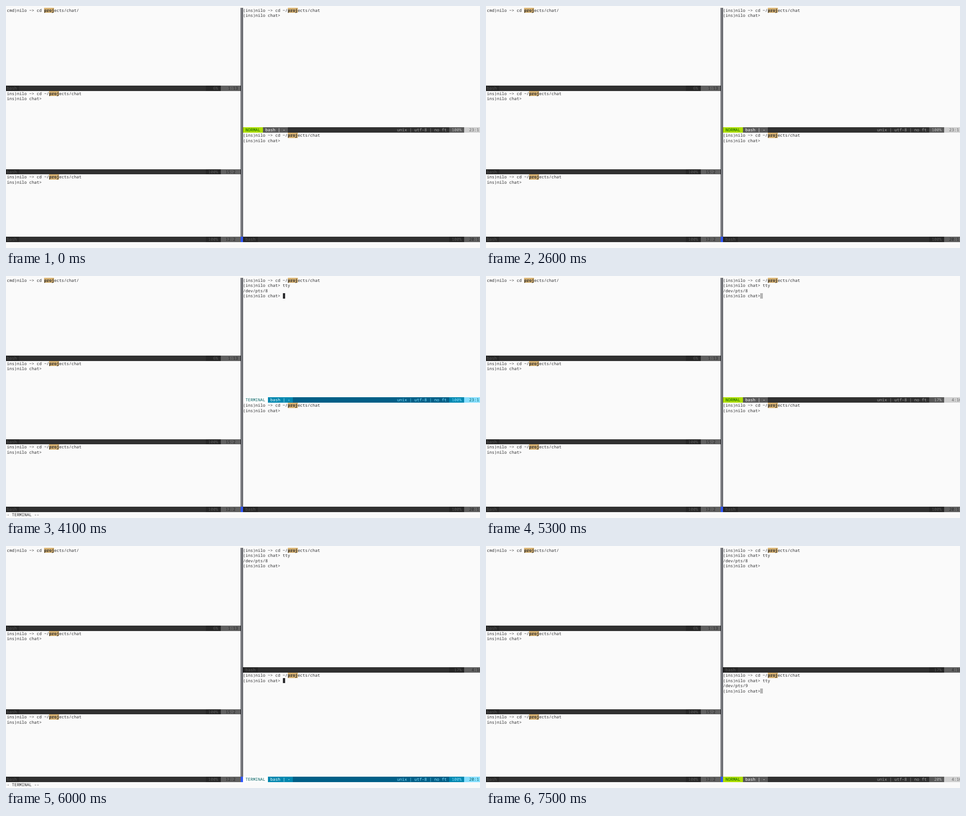
Recreate the animation shown at these times as an HTML page with a canvas. Size 1046 by 535 pixels, loop 8 s.

```html
<!DOCTYPE html>
<html>
<head>
<meta charset="utf-8">
<style>
html, body { margin: 0; width: 100%; height: 100%; overflow: hidden; background: #fafafa; }
canvas { display: block; }
</style>
</head>
<body>
<canvas id="stage" width="1046" height="535"></canvas>
<script>
const ctx = document.getElementById('stage').getContext('2d');
const LOOP = 8000, PAPER = '#fafafa', INK = '#2c2c2e', USER = 'nilo';
const FONT = '9.14px "Noto Sans Mono", monospace';

// Terminal grid: 192 columns, cropped slightly at both sides.
const colX = col => 5.484 * col - 3.48;
const rowY = row => 11.52 * row + 3.5;

function fill(col, row, cols, color, rows = 1) {
  const x = Math.round(colX(col)), y = Math.round(rowY(row));
  ctx.fillStyle = color;
  ctx.fillRect(x, y, Math.round(colX(col + cols)) - x, Math.round(rowY(row + rows)) - y);
}

function put(col, row, text, color = INK, back, bold) {
  if (back) fill(col, row, text.length, back);
  ctx.font = (bold ? 'bold ' : '') + FONT;
  ctx.fillStyle = color;
  ctx.fillText(text, colX(col), rowY(row) + 9);
}

const STYLES = {
  normal: {
    middle: ['#9e9e9e', '#303030'], mode: ['#005f00', '#afdf00'], file: ['#ffffff', '#585858'],
    percent: ['#bcbcbc', '#585858'], place: ['#606060', '#d0d0d0']
  },
  terminal: {
    middle: ['#87dfff', '#005f87'], mode: ['#005f5f', '#ffffff'], file: ['#ffffff', '#0087af'],
    percent: ['#87dfff', '#0087af'], place: ['#005f5f', '#87dfff']
  },
  inactive: {
    middle: ['#585858', '#303030'], file: ['#585858', '#262626'],
    percent: ['#585858', '#262626'], place: ['#262626', '#606060']
  }
};

function statusBar(col, row, width, mode, percent, place) {
  const style = STYLES[mode];
  const right = col + width;
  fill(col, row, width, style.middle[1]);
  if (mode === 'inactive') {
    put(col, row, ' bash ', ...style.file);
  } else {
    const label = ` ${mode.toUpperCase()} `;
    put(col, row, label, ...style.mode);
    put(col + label.length, row, ' bash | - ', ...style.file);
    put(right - 35, row, 'unix | utf-8 | no ft', style.middle[0]);
  }
  const [line, column] = place.split(':');
  put(right - 14, row, ` ${percent.padStart(4)} `, ...style.percent);
  put(right - 8, row, `${line.padStart(4)}:${column.padEnd(3)}`, ...style.place);
}

function cdLine(col, row, mode, path) {
  const lead = `(${mode})${USER} ~> cd ${path}`;
  const skip = col === 0 ? 1 : 0;
  put(col + skip, row, lead.slice(skip));
  put(col + lead.length, row, 'proj', INK, '#d7b272', true);
  put(col + lead.length + 4, row, 'ects/chat' + (path ? '' : '/'));
}

function shell(col, row, typed = '', output) {
  const prompt = `(ins)${USER} chat> `;
  const skip = col === 0 ? 1 : 0;
  cdLine(col, row, 'ins', '~/');
  put(col + skip, row + 1, prompt.slice(skip) + typed);
  if (output) {
    put(col, row + 2, output);
    put(col, row + 3, prompt);
  }
}

// Window state for a session: enter terminal mode, type, run, leave.
function session(t, start, keys, run, leave, idle, done) {
  const ran = t >= run, left = t >= leave;
  const typed = ran ? 'tty' : 'tty'.slice(0, keys.filter(k => t >= k).length);
  return {
    typed, ran,
    mode: t >= start && !left ? 'terminal' : 'normal',
    percent: left ? done : '100%',
    place: left ? '4:16' : idle
  };
}

function drawCursor(win, top, idleRow, left, idleVisible) {
  if (win.mode === 'terminal') {
    fill(112 + (win.ran ? 0 : win.typed.length), top + (win.ran ? 3 : 1), 1, INK);
  } else if (left) {
    fill(111, top + 3, 1, '#b6b6b6');
  } else if (idleVisible) {
    fill(96, idleRow, 1, '#b6b6b6');
  }
}

function draw(t) {
  ctx.fillStyle = PAPER;
  ctx.fillRect(0, 0, 1046, 535);

  cdLine(0, 0, 'cmd', '');
  statusBar(0, 15, 95, 'inactive', '6%', '1:13');
  shell(0, 16);
  statusBar(0, 31, 95, 'inactive', '100%', '15:2');
  shell(0, 32);
  statusBar(0, 44, 95, 'inactive', '100%', '12:2');

  const upper = session(t, 3000, [3600, 3800, 3800], 4100, 5300, '23:1', '17%');
  const lower = session(t, 6000, [6300, 6400, 6600], 6800, 7500, '20:1', '20%');
  const onLower = t >= 5700;
  shell(96, 0, upper.typed, upper.ran && '/dev/pts/8');
  shell(96, 24, lower.typed, lower.ran && '/dev/pts/9');
  statusBar(96, 23, 97, onLower ? 'inactive' : upper.mode, upper.percent, upper.place);
  statusBar(96, 44, 97, onLower ? lower.mode : 'inactive', lower.percent, lower.place);

  if (onLower) {
    drawCursor(lower, 24, 43, t >= 7500, true);
  } else {
    const blink = t >= 2200 ? t < 2600 : (t + 300) % 1000 >= 500;
    drawCursor(upper, 0, 22, t >= 5300, blink);
  }

  fill(95, 0, 1, '#1b1d26', 44);
  ctx.fillStyle = PAPER;
  ctx.fillRect(519.8, rowY(0), 1.4, rowY(44) - rowY(0));
  fill(95, 44, 1, '#2f55ff');

  if (upper.mode === 'terminal' || lower.mode === 'terminal') put(0, 45, '-- TERMINAL --');
  if (t >= 5600 && !onLower) put(181, 45, '^W');
}

ctx.textRendering = 'geometricPrecision';
const began = performance.now();
function tick() {
  draw((performance.now() - began) % LOOP);
  requestAnimationFrame(tick);
}
tick();
</script>
</body>
</html>
```
